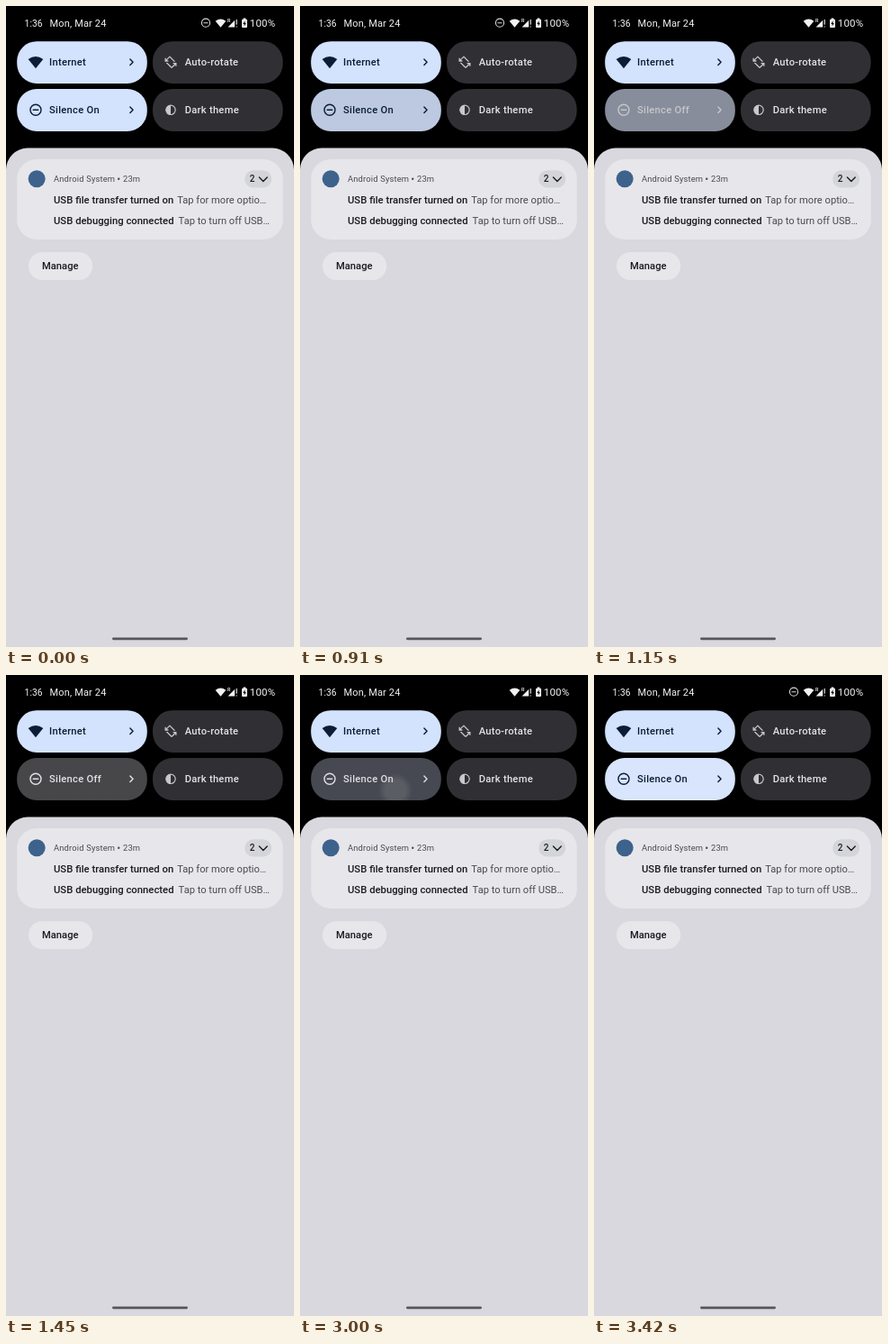
These frames come from a looping animation (320 by 711 pixels, 3450 ms). An HTML page:

```html
<!DOCTYPE html>
<html lang="en">
<head>
<meta charset="utf-8">
<title>Quick settings</title>
<style>
  html, body { margin: 0; width: 100%; height: 100%; overflow: hidden; background: #000; }
  svg { display: block; width: 320px; height: 711px; }
  text { font: 500 11.3px Roboto, "Open Sans", sans-serif; fill: #1b1b1f; white-space: pre; }
  .tile { font-size: 11.2px; letter-spacing: .26px; }
  .status { font-weight: 400; font-size: 11px; letter-spacing: .15px; fill: #f2f2f4; }
  .soft { font-weight: 400; font-size: 11.15px; fill: #484950; }
  .head { font-weight: 400; font-size: 9.4px; letter-spacing: .16px; fill: #484950; }
  .line { fill: none; stroke-width: 1.4; stroke-linecap: round; stroke-linejoin: round; }
</style>
</head>
<body>
<svg viewBox="0 0 320 711" xmlns="http://www.w3.org/2000/svg">
  <defs>
    <rect id="pill" width="144.6" height="46.8" rx="22"/>
    <clipPath id="clip"><use href="#pill" x="12.2" y="92.1"/></clipPath>
    <radialGradient id="glow">
      <stop offset=".6" stop-color="#fff"/>
      <stop offset="1" stop-color="#fff" stop-opacity="0"/>
    </radialGradient>
    <path id="fan" d="M-8.3-3.6Q0-9.6 8.3-3.6L0 6.6Z"/>
    <g id="dnd" class="line"><circle r="6"/><path d="M-2.8 0H2.8"/></g>
    <path id="next" class="line" d="M-1.6-3.2L1.6 0L-1.6 3.2"/>
  </defs>

  <rect width="320" height="711" fill="#000"/>

  <!-- Status bar -->
  <text class="status" x="20.6" y="22.5" style="font-size:10.4px;letter-spacing:0">1:36</text>
  <text class="status" x="48.6" y="22.5">Mon, Mar 24</text>
  <use id="badge" href="#dnd" transform="translate(222 18.7) scale(.76)" stroke="#dcdce0"/>
  <use href="#fan" transform="translate(238.5 19.2) scale(.7)" fill="#f2f2f4"/>
  <path d="M246.6 23.5L254.2 15.8V23.5Z" fill="#f2f2f4"/>
  <path class="line" d="M256.2 15.3V20.2M256.2 22.8V23" stroke="#f2f2f4" style="stroke-width:1.1"/>
  <text x="246" y="17.6" style="font-size:5.5px;fill:#f2f2f4">R</text>
  <path d="M262 15.8Q262 14.8 263 14.8H263.6V13.6H266.4V14.8H267Q268 14.8 268 15.8V23Q268 24 267 24H263Q262 24 262 23Z" fill="#f2f2f4"/>
  <path d="M265.5 16.2L263.3 19.9H264.7V22.6L266.8 18.9H265.5Z" fill="#000"/>
  <text class="status" x="270.8" y="22.5" style="font-size:11.5px">100%</text>

  <!-- Tiles -->
  <use href="#pill" x="12.2" y="39.2" fill="#d3e2fd"/>
  <use href="#fan" transform="translate(33 62.6)" fill="#0b1d35"/>
  <text class="tile" x="48" y="66.2" style="fill:#0b1d35">Internet</text>
  <use href="#next" x="139.5" y="62.3" stroke="#0b1d35"/>

  <use href="#pill" x="163" y="39.2" fill="#303034"/>
  <path transform="translate(175.2 54.5) scale(.65)" fill="#c8c8cc"
    d="M4 7.6L9 2.6C9.8 1.8 11 1.8 11.8 2.6L20.2 11H17.4L10.4 4L5.4 9H8V11H2V5H4ZM20 19H22V13H16V15H18.6L13.6 20L6.6 13H3.8L12.2 21.4C13 22.2 14.2 22.2 15 21.4L20 16.4Z"/>
  <text class="tile" x="198.7" y="66.2" style="fill:#e3e2e6">Auto-rotate</text>

  <use href="#pill" x="163" y="92.1" fill="#303034"/>
  <g transform="translate(183 115.3)">
    <circle class="line" r="5.2" stroke="#c8c8cc" style="stroke-width:1.2"/>
    <path d="M0-5.2A5.2 5.2 0 0 0 0 5.2Z" fill="#c8c8cc"/>
  </g>
  <text class="tile" x="198.7" y="119.2" style="fill:#e3e2e6">Dark theme</text>

  <g clip-path="url(#clip)">
    <rect id="face" x="12" y="92" width="145" height="47"/>
    <rect id="press" x="12" y="92" width="145" height="47" fill="#000"/>
    <circle id="ripple" cx="106" cy="128" fill="url(#glow)"/>
  </g>
  <g id="ink">
    <use href="#dnd" x="33" y="115.3"/>
    <use href="#next" x="139.5" y="115.3"/>
  </g>
  <text id="label" class="tile" x="48" y="119.2">Silence On</text>

  <!-- Notification shade -->
  <path d="M0 711V181.6A24 24 0 0 1 24 157.6H296A24 24 0 0 1 320 181.6V711Z" fill="#d8d8de"/>
  <rect x="12.3" y="170" width="295.4" height="89" rx="21.8" fill="#e7e7eb"/>
  <circle cx="34.2" cy="191.8" r="9.5" fill="#3d628c"/>
  <text class="head" x="53" y="195">Android System</text>
  <circle cx="125.2" cy="191.8" r="1.2" fill="#484950"/>
  <text class="head" x="130" y="195">23m</text>
  <rect x="265.2" y="182.2" width="30" height="19.4" rx="9.7" fill="#d4d5da"/>
  <text x="270.8" y="195.3" style="font-size:10px">2</text>
  <path class="line" d="M281.4 190L285.8 194.4L290.2 190" stroke="#1b1b1f"/>
  <text x="53" y="219.4">USB file transfer turned on</text>
  <text class="soft" x="190.2" y="219.4">Tap for more optio…</text>
  <text x="53" y="242">USB debugging connected</text>
  <text class="soft" x="191.6" y="242">Tap to turn off USB…</text>
  <rect x="25" y="273" width="71.2" height="31" rx="15.5" fill="#e7e7eb"/>
  <text x="40" y="292" style="font-size:11.2px">Manage</text>
  <rect x="118" y="700.4" width="84" height="2.8" rx="1.4" fill="#56565b"/>
</svg>
<script>
  const LOOP = 3450, OFF_AT = 920, ON_AT = 2950, FADE = 350;
  const FACE = { on: [211, 226, 253], off: [48, 48, 52] };
  const INK = { on: [11, 29, 53], off: [227, 226, 230] };

  const $ = id => document.getElementById(id);
  const clamp = x => Math.min(1, Math.max(0, x));
  const ease = x => (1 - Math.cos(Math.PI * clamp(x))) / 2;
  const ramp = (t, from, to) => clamp((t - from) / (to - from));

  // Colours blend in linear light.
  const blend = (a, b, p) => "rgb(" + a.map((v, i) =>
    Math.round((v ** 2.2 * (1 - p) + b[i] ** 2.2 * p) ** (1 / 2.2))) + ")";

  function draw(t) {
    const isOff = t >= OFF_AT && t < ON_AT;
    const off = ease((t - OFF_AT) / FADE) - ease((t - ON_AT) / FADE);
    const ink = blend(INK.on, INK.off, off);
    const text = isOff ? "Silence Off" : "Silence On";
    $("face").setAttribute("fill", blend(FACE.on, FACE.off, off));
    $("ink").setAttribute("stroke", ink);
    $("label").style.fill = ink;
    if ($("label").textContent !== text) $("label").textContent = text;

    // The press darkens the tile; each toggle then sends out a light ripple.
    $("press").setAttribute("opacity", .11 * (ramp(t, 300, 540) - ramp(t, OFF_AT, 1050)));
    const age = t - (t < ON_AT ? OFF_AT : ON_AT);
    $("ripple").setAttribute("r", 190 * ease(age / 250));
    $("ripple").setAttribute("opacity", .11 * (1 - ramp(age, 540, 750)));
    $("badge").setAttribute("opacity", 1 - ramp(t, 940, 1040) + ramp(t, 3060, 3180));
  }

  const start = performance.now();
  function tick() {
    draw((performance.now() - start) % LOOP);
    requestAnimationFrame(tick);
  }
  tick();
</script>
</body>
</html>
```
